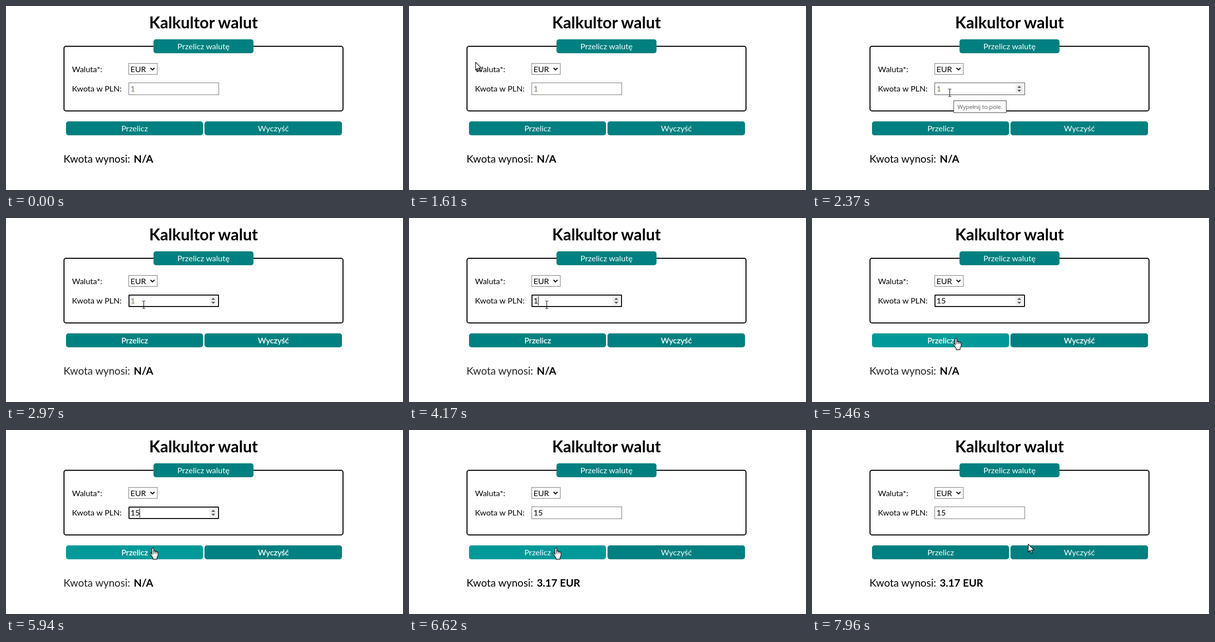
An HTML page for the animation above (8 s loop, 794x370 px).

```html
<!DOCTYPE html>
<html lang="pl">
<head>
<meta charset="utf-8">
<title>Kalkulator</title>
<style>
  html, body { margin: 0; width: 100%; height: 100%; overflow: hidden; background: #fff; }
  svg { display: block; font: 16px Lato, sans-serif; }
  .title { font-size: 32px; font-weight: bold; }
  .result { font-size: 20.8px; }
  .middle { text-anchor: middle; }
  .teal { fill: #008080; }
  .white { fill: #fff; stroke: #fff; stroke-width: 0; }
  .field { fill: #fff; stroke: #767676; }
  .line { fill: none; stroke: #000; }
  .pointer { fill: #fff; stroke: #000; stroke-width: 1.1; stroke-linejoin: round; }
  #tooltip text { font: 11.6px "Open Sans", sans-serif; fill: #555; }
</style>
</head>
<body>
<svg width="794" height="370" viewBox="0 0 794 370">
  <text class="title middle" x="395" y="45">Kalkultor walut</text>

  <rect class="line" x="116" y="81" width="558" height="130" rx="4" stroke-width="2"/>
  <rect class="teal" x="295" y="67" width="200" height="28" rx="5"/>
  <text class="white middle" x="395" y="87">Przelicz walutę</text>

  <text x="132" y="133">Waluta*:</text>
  <rect class="field" x="245.5" y="115.5" width="57" height="22"/>
  <text x="249" y="133">EUR</text>
  <path class="line" d="M289 124.5l4 4 4-4" stroke-width="2"/>

  <text x="132" y="172">Kwota w PLN:</text>
  <rect class="field" id="input" x="245.5" y="154.5" width="180" height="24"/>
  <rect class="line" id="ring" x="246" y="155" width="179" height="23" rx="2" stroke-width="2" style="stroke:#101010"/>
  <text id="value" x="249" y="172"></text>
  <rect id="caret" y="157" width="1" height="19"/>
  <g id="spinner">
    <rect x="407" y="157" width="15" height="19" fill="#f0f0f0"/>
    <path d="M410.5 164.5l4-4 4 4zM410.5 168.5l4 4 4-4z" fill="#505050"/>
  </g>

  <rect class="teal" id="convert" x="120" y="232" width="274" height="28" rx="5"/>
  <text class="white middle button" x="257.3" y="252">Przelicz</text>
  <rect class="teal" x="397" y="232" width="275" height="28" rx="5"/>
  <text class="white middle button" x="534.7" y="252">Wyczyść</text>

  <text class="result" id="label" x="115" y="315">Kwota wynosi:</text>
  <text class="result" id="result" x="255.5" y="315" font-weight="bold"></text>

  <g id="tooltip">
    <rect x="283.5" y="190.5" width="105" height="24" fill="#fff" stroke="#444"/>
    <text x="291" y="207">Wypełnij to pole.</text>
  </g>

  <g id="cursor">
    <path class="pointer" id="arrow" d="M.5.5V16.5L4.2 13l2.6 6 2.4-1-2.6-5.8H12z"/>
    <path class="line" id="beam" d="M-3-7.5h2q1 0 1 1q0-1 1-1h2M0-6.5v13M-3 7.5h2q1 0 1-1q0 1 1 1h2"/>
    <g id="hand" transform="translate(-6)">
      <path class="pointer" d="M4.5 14V2.3a1.7 1.7 0 0 1 3.4 0V8a1.6 1.6 0 0 1 3.2.3a1.6 1.6 0 0 1 2.9.6a1.5 1.5 0 0 1 2.5 1.2V16l-2 4v3.4H6.5V20.5L1 13.2a1.6 1.6 0 0 1 2.2-2.2z"/>
      <path class="line" d="M7.9 8v4M11.1 8.5v3.5M14 9v3"/>
    </g>
  </g>
</svg>
<script>
  const LOOP = 8000;
  // [time, x, y] of the pointer's hot spot
  const path = [
    [1460, 30, 95], [1600, 125, 110], [1740, 222, 142], [1900, 275.5, 174.5],
    [4910, 275.5, 174.5], [4980, 277, 205], [5050, 280, 236], [5120, 281, 240],
    [5189, 281, 240], [5260, 283, 245], [5600, 291, 239], [5810, 293.5, 236.5],
    [7889, 293.5, 236.5], [7890, 345, 236], [7959, 345, 236], [7960, 432, 229], [LOOP, 432, 229]
  ];
  // times at which the caret toggles, beginning with "on"
  const blinks = [2440, 2970, 3510, 4040, 4170, 4710, 4910, 5440, 5940, 6420];

  const $ = id => document.getElementById(id);
  const show = (id, visible) => { $(id).style.display = visible ? '' : 'none'; };
  const within = (v, from, to) => v >= from && v < to;

  function pointerAt(t) {
    const next = path.findIndex(key => key[0] > t);
    if (next < 1) return [-50, -50];
    const [t0, x0, y0] = path[next - 1], [t1, x1, y1] = path[next];
    const k = (t - t0) / (t1 - t0);
    return [x0 + (x1 - x0) * k, y0 + (y1 - y0) * k];
  }

  function render(t) {
    const [x, y] = pointerAt(t);
    const overInput = within(x, 245, 426) && within(y, 154, 179);
    const overButton = within(x, 120, 394) && within(y, 232, 260);
    const focused = within(t, 2440, 6420);
    const typed = t < 4170 ? '' : t < 4910 ? '1' : '15';

    $('cursor').setAttribute('transform', `translate(${x} ${y})`);
    show('cursor', t >= 1460);
    show('beam', overInput);
    show('hand', overButton);
    show('arrow', !overInput && !overButton);

    $('input').style.stroke = overInput ? '#4f4f4f' : '#767676';
    show('ring', focused);
    show('spinner', focused || overInput);
    $('value').textContent = typed || '1';
    $('value').style.fill = typed ? '#000' : '#857860';
    $('caret').setAttribute('x', 249 + 9 * typed.length);
    show('caret', blinks.filter(b => b <= t).length % 2);

    $('convert').style.fill = overButton ? '#009999' : '#008080';
    document.querySelectorAll('.button').forEach(b => { b.style.strokeWidth = focused ? .3 : 0; });
    $('label').style.fill = focused ? '#222' : '#000';
    $('result').textContent = t < 6550 ? 'N/A' : '3.17 EUR';
    $('tooltip').style.opacity = t < 2440 ? Math.min(1, Math.max(0, (t - 2040) / 200)) : 0;
  }

  const start = performance.now();
  function tick() {
    render((performance.now() - start) % LOOP);
    requestAnimationFrame(tick);
  }
  tick();
</script>
</body>
</html>
```
